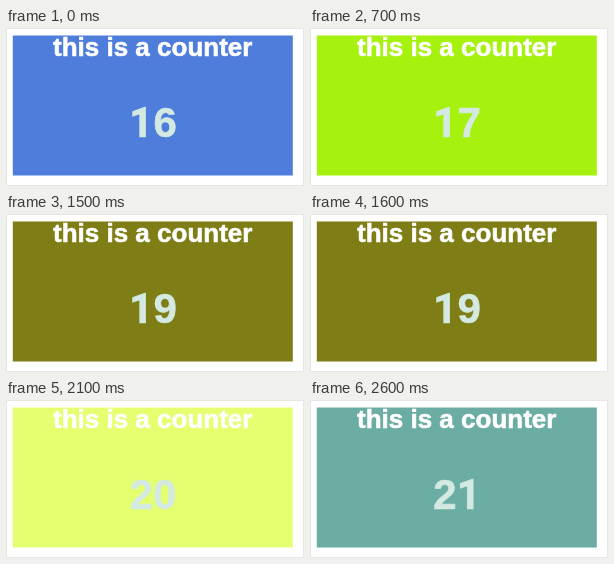
Recreate the animation shown at these times as an HTML page. Size 298x158 px, loop 2.8 s.

```html
<!DOCTYPE html>
<html lang="en">
<head>
<meta charset="utf-8">
<title>Counter</title>
<style>
  html, body { margin: 0; width: 100%; height: 100%; overflow: hidden; background: #fff; }
  svg { display: block; width: 298px; height: 158px; }
  text {
    font-family: "Liberation Sans", Arial, sans-serif;
    font-weight: bold;
    text-anchor: middle;
    stroke-width: .6;
  }
  .plain-one { font-family: Roboto, sans-serif; }
</style>
</head>
<body>
<svg viewBox="0 0 298 158">
  <rect x=".5" y=".5" width="297" height="157" fill="#fff" stroke="#e6e6e6"/>
  <rect id="panel" x="6.8" y="7.5" width="280" height="140"/>
  <text x="146.7" y="27.6" font-size="26" fill="#fff" stroke="#fff">this is a counter</text>
  <text id="count" x="147" y="109" font-size="42" fill="#d3e9e2" stroke="#d3e9e2"></text>
</svg>
<script>
  const LOOP = 2800, STEP = 500, FIRST = 16;
  const colors = ["#4f7ddb", "#a6f20e", "#670068", "#7f7d15", "#e4ff70", "#6bada2"];
  const panel = document.getElementById("panel");
  const count = document.getElementById("count");
  const start = performance.now();
  let shown;

  function show(step) {
    panel.setAttribute("fill", colors[step]);
    // The digit 1 is set in a face without a foot serif.
    count.innerHTML = String(FIRST + step).replace("1", '<tspan class="plain-one">1</tspan>');
    shown = step;
  }

  function draw() {
    const step = Math.floor(((performance.now() - start) % LOOP) / STEP);
    if (step !== shown) show(step);
    requestAnimationFrame(draw);
  }
  draw();
</script>
</body>
</html>
```
